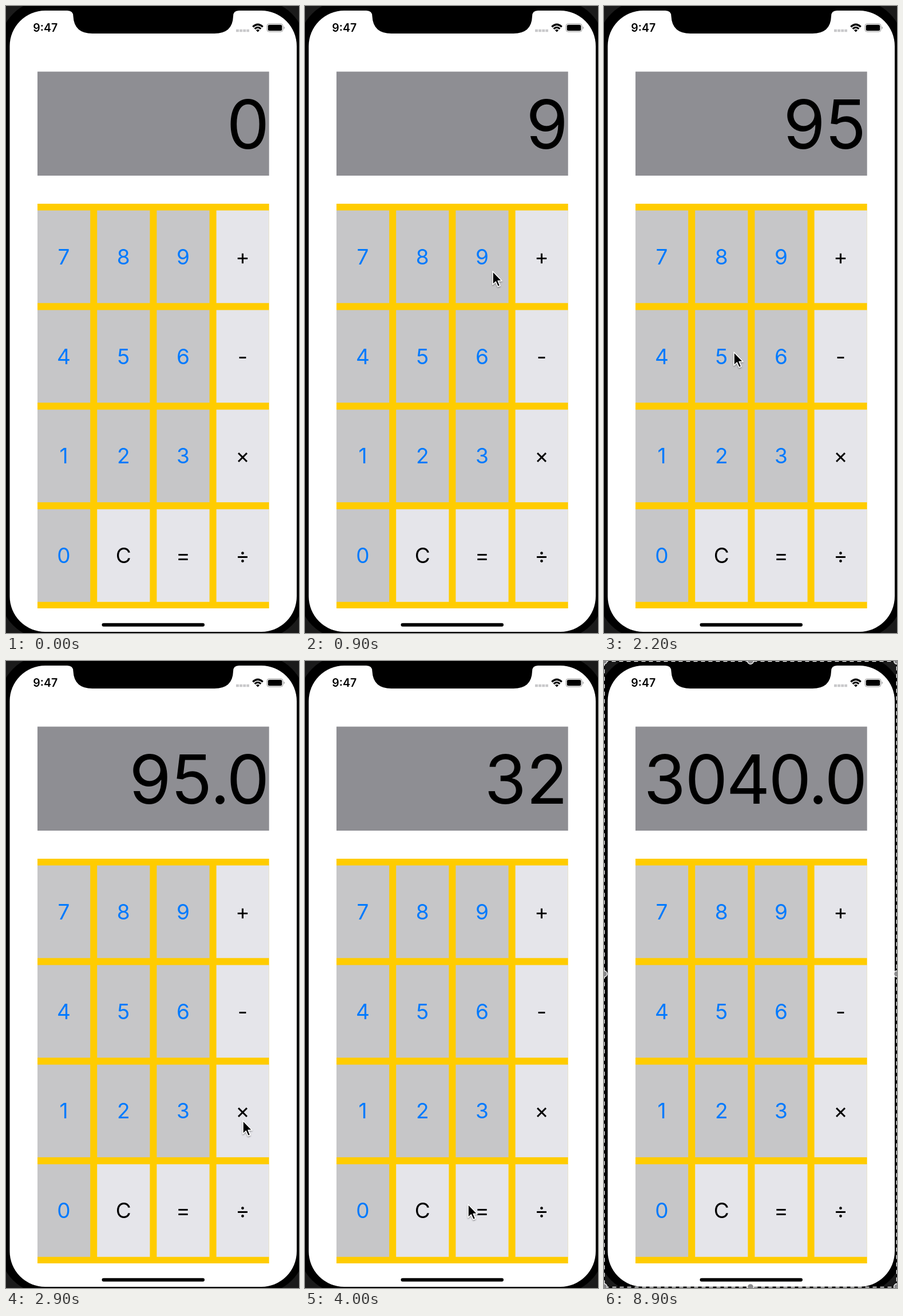
These frames come from a looping animation (512 by 1094 pixels, 10 s). An HTML page:

```html
<!DOCTYPE html>
<html lang="en">
<head>
<meta charset="utf-8">
<title>Calculator</title>
<style>
  html, body { margin: 0; width: 100%; height: 100%; overflow: hidden; background: #000; }
  svg { display: block; width: 100vw; height: 100vh; }
  text { font-family: Inter, Roboto, sans-serif; text-anchor: middle; }
</style>
</head>
<body>
<svg viewBox="0 0 512 1094">
  <defs>
    <filter id="shadow" x="-50%" y="-50%" width="200%" height="200%">
      <feDropShadow dx="0" dy="1.5" stdDeviation="1.3" flood-opacity=".4"/>
    </filter>
  </defs>

  <!-- phone -->
  <rect width="512" height="1094" fill="#1b1b1b"/>
  <rect x="-11" y="-10" width="534" height="1114" rx="80"/>
  <rect x="6.5" y="8" width="501.5" height="1084" rx="62" fill="#fff"/>
  <path d="M107 7V8Q117.500 8 117.500 18Q119 48 151 48H364Q396 48 397 18Q397 8 407 8V7Z"/>

  <!-- status bar -->
  <text x="68.700" y="45" font-size="19.500" font-weight="600">9:47</text>
  <path d="M402 43H425" stroke="#c9c9cb" stroke-width="4.500" stroke-dasharray="5 1.100"/>
  <g fill="none" stroke="#000" stroke-width="3.200">
    <path d="M431.300 36.300Q440 28.200 448.700 36.300"/>
    <path d="M434.600 39.900Q440 35 445.400 39.900"/>
  </g>
  <path d="M440 45.500L436.900 42.300Q440 39.600 443.100 42.300Z"/>
  <rect x="456" y="31" width="28" height="14" rx="4" fill="#fff" stroke="#999"/>
  <rect x="457.700" y="32.700" width="24.600" height="10.600" rx="2.500"/>
  <path d="M485.500 35.500Q488.500 38 485.500 40.500Z" fill="#999"/>

  <!-- calculator -->
  <rect x="55" y="114.500" width="404.700" height="181.500" fill="#8e8e93"/>
  <text id="display" y="248.500" font-size="118.500"></text>
  <rect x="55" y="345" width="404.700" height="706" fill="#fc0"/>
  <g id="keys" font-size="37"></g>
  <rect x="167.500" y="1076.800" width="179.500" height="6" rx="3"/>

  <g id="frame">
    <rect x=".5" y=".5" width="511" height="1092" fill="none" stroke="#000" stroke-width="2"/>
    <rect x=".5" y=".5" width="511" height="1092" fill="none" stroke="#fff" stroke-width="1.500" stroke-dasharray="7 6"/>
  </g>

  <path id="cursor" filter="url(#shadow)" stroke="#fff" stroke-width="1.600" stroke-linejoin="round"
    d="M1 1V24L6.300 19L10 27.500L13.800 26L10.200 17.500H17Z"/>
</svg>

<script>
const LOOP = 10000, STEP = 100, SELECT_AT = 8900;
const $ = id => document.getElementById(id);

function add(parent, tag, attrs, text = '') {
  const el = document.createElementNS('http://www.w3.org/2000/svg', tag);
  for (const name in attrs) el.setAttribute(name, attrs[name]);
  el.textContent = text;
  parent.append(el);
}

// Keypad
[...'789+456-123×0C=÷'].forEach((label, i) => {
  const x = 55 + (i % 4) * 104.2, y = 356.7 + (i >> 2) * 173.8;
  const digit = label >= '0' && label <= '9';
  add($('keys'), 'rect', { x, y, width: 92.2, height: 161.6, fill: digit ? '#c6c6c8' : '#e5e5ea' });
  add($('keys'), 'text', { x: x + 46, y: y + 94, fill: digit ? '#007aff' : '#000' }, label);
});

// Selection handles
for (const x of [0, 256, 512])
  for (const y of [0, 546, 1092])
    if (x !== 256 || y !== 546)
      add($('frame'), 'circle', { cx: x, cy: y, r: 5.5, fill: '#8a8a8c', stroke: '#fff', 'stroke-width': 1.3 });

// [time, value shown]
const readings = [
  [0, '0'], [800, '9'], [2100, '95'], [2800, '95.0'],
  [3200, '3'], [3600, '32'], [4400, '3040.0']
];

// [time, x, y] of the pointer tip
const track = [
  [400, 312, 640], [700, 327, 462], [900, 327, 462], [1100, 310, 602], [1200, 310, 601],
  [1700, 310, 601], [1900, 160, 606], [2100, 226, 603], [2200, 226, 603],
  [2500, 484, 1047], [2700, 413, 803], [2900, 413, 801], [3100, 325, 808],
  [3200, 325, 808], [3400, 156, 808], [3600, 212, 803], [3800, 212, 803],
  [4000, 284, 947], [4300, 305, 965], [4700, 305, 965]
];

function showValue(value) {
  const xs = [];
  let right = 459.5;
  for (const ch of [...value].reverse()) {
    const advance = ch === '.' ? 25 : 73;
    xs.unshift(right - advance / 2);
    right -= advance;
  }
  $('display').setAttribute('x', xs.join(' '));
  $('display').textContent = value;
}

function pointerAt(t) {
  const next = track.findIndex(p => p[0] > t);
  if (next < 1) return null;
  const [t0, x0, y0] = track[next - 1], [t1, x1, y1] = track[next];
  const u = (t - t0) / (t1 - t0), k = u * u * (3 - 2 * u);
  return [x0 + (x1 - x0) * k, y0 + (y1 - y0) * k];
}

const show = (id, on) => $(id).setAttribute('visibility', on ? 'visible' : 'hidden');

function render(ms) {
  const t = Math.floor(ms % LOOP / STEP) * STEP;
  showValue(readings.filter(r => r[0] <= t).pop()[1]);
  show('frame', t >= SELECT_AT);
  const tip = pointerAt(t);
  show('cursor', tip);
  if (tip) $('cursor').setAttribute('transform', `translate(${tip})`);
}

const start = performance.now();
function tick() {
  render(performance.now() - start);
  requestAnimationFrame(tick);
}
tick();
</script>
</body>
</html>
```
